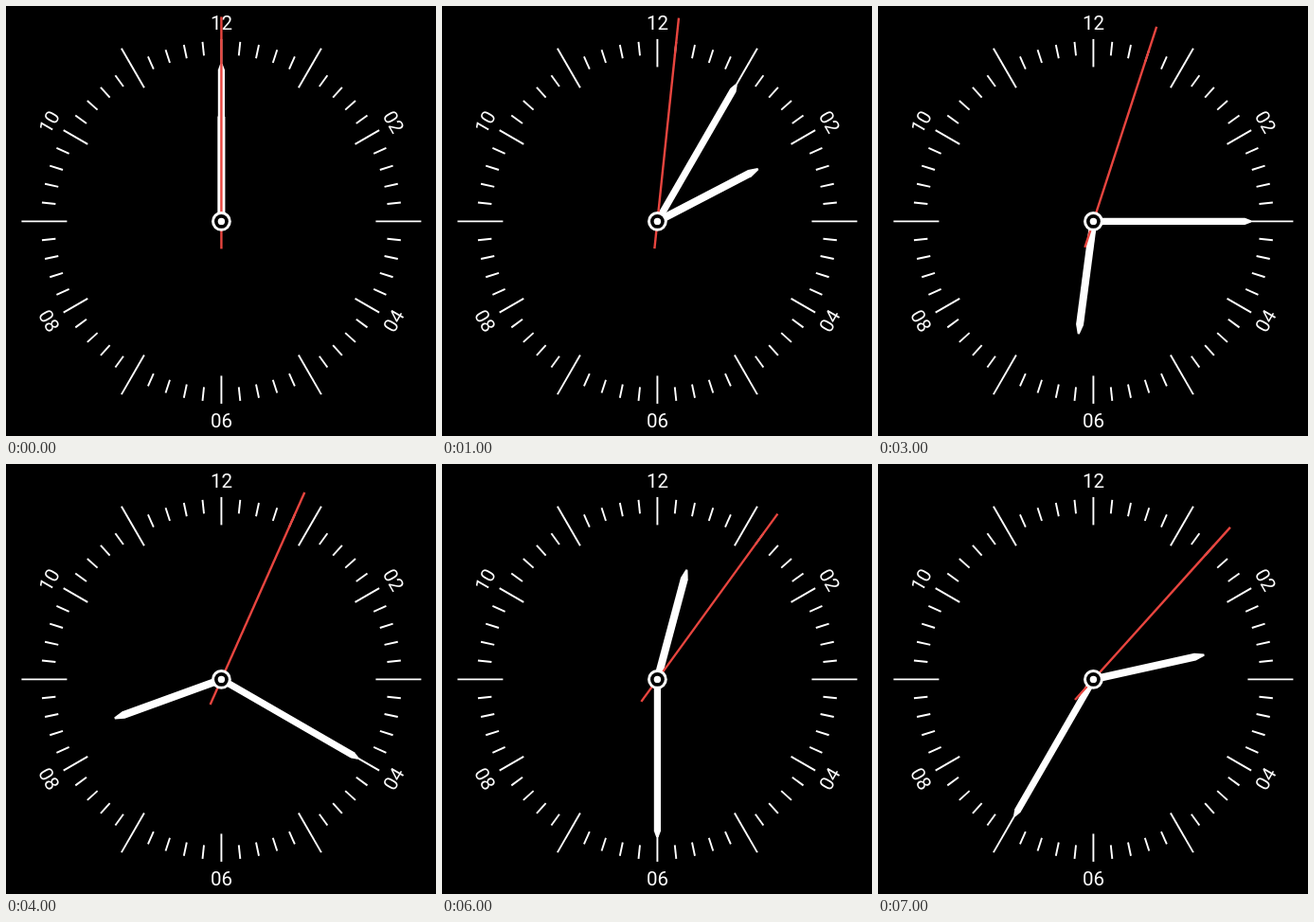
Write an HTML page that moves like this. It is 454 px wide and 454 px high and loops after 8 s.

```html
<!DOCTYPE html>
<html lang="en">
<head>
<meta charset="utf-8">
<title>Fast clock</title>
<style>
  html, body { margin: 0; width: 100%; height: 100%; overflow: hidden; background: #000; }
  svg { display: block; width: 454px; height: 454px; }
  text { font: 20.5px Roboto, sans-serif; fill: #fff; text-anchor: middle; }
</style>
</head>
<body>
<svg viewBox="0 0 454 454">
  <rect width="454" height="454" fill="#000"/>
  <g transform="translate(227.4 227.4)">
    <g id="dial" stroke="#fff" stroke-width="1.9"></g>
    <g id="labels"></g>
    <path id="hour" fill="#fff" d="M-4 0V-110L-1 -120H1L4 -110V0Z"/>
    <path id="minute" fill="#fff" d="M-3.6 0V-160L-1.2 -166.5H1.2L3.6 -160V0Z"/>
    <path id="second" stroke="#e8453f" stroke-width="2.4" d="M0 29V-216"/>
    <circle r="10.4" fill="#fff"/>
    <circle r="7.4" fill="#000"/>
    <circle r="3.7" fill="#fff"/>
  </g>
</svg>
<script>
const NS = "http://www.w3.org/2000/svg";
const LOOP = 8000, STEP = 1000;
const $ = id => document.getElementById(id);

function add(parent, tag, attrs) {
  const el = document.createElementNS(NS, tag);
  for (const key in attrs) el.setAttribute(key, attrs[key]);
  return parent.appendChild(el);
}

for (let i = 0; i < 60; i++) {
  const [inner, outer] = i % 5 ? [176, 190.5] : i % 10 ? [163, 211] : [163, 192.5];
  add($("dial"), "line", { y1: -inner, y2: -outer, transform: `rotate(${i * 6})` });
}

// Lower labels are flipped so that they read upright.
for (let h = 2; h <= 12; h += 2) {
  const angle = h * 30 % 360;
  const flip = angle > 90 && angle < 270 ? 180 : 0;
  const label = add($("labels"), "text", {
    y: 7.3,
    transform: `rotate(${angle}) translate(0 -210) rotate(${flip})`
  });
  label.textContent = String(h).padStart(2, "0");
}

const turn = (id, angle) => $(id).setAttribute("transform", `rotate(${angle})`);

function draw(ms) {
  const k = Math.floor(ms % LOOP / STEP);
  turn("hour", k * 62.5);
  turn("minute", k * 30);
  turn("second", k * 6);
}

const start = performance.now();
function tick() {
  draw(performance.now() - start);
  requestAnimationFrame(tick);
}
draw(0);
requestAnimationFrame(tick);
</script>
</body>
</html>
```
